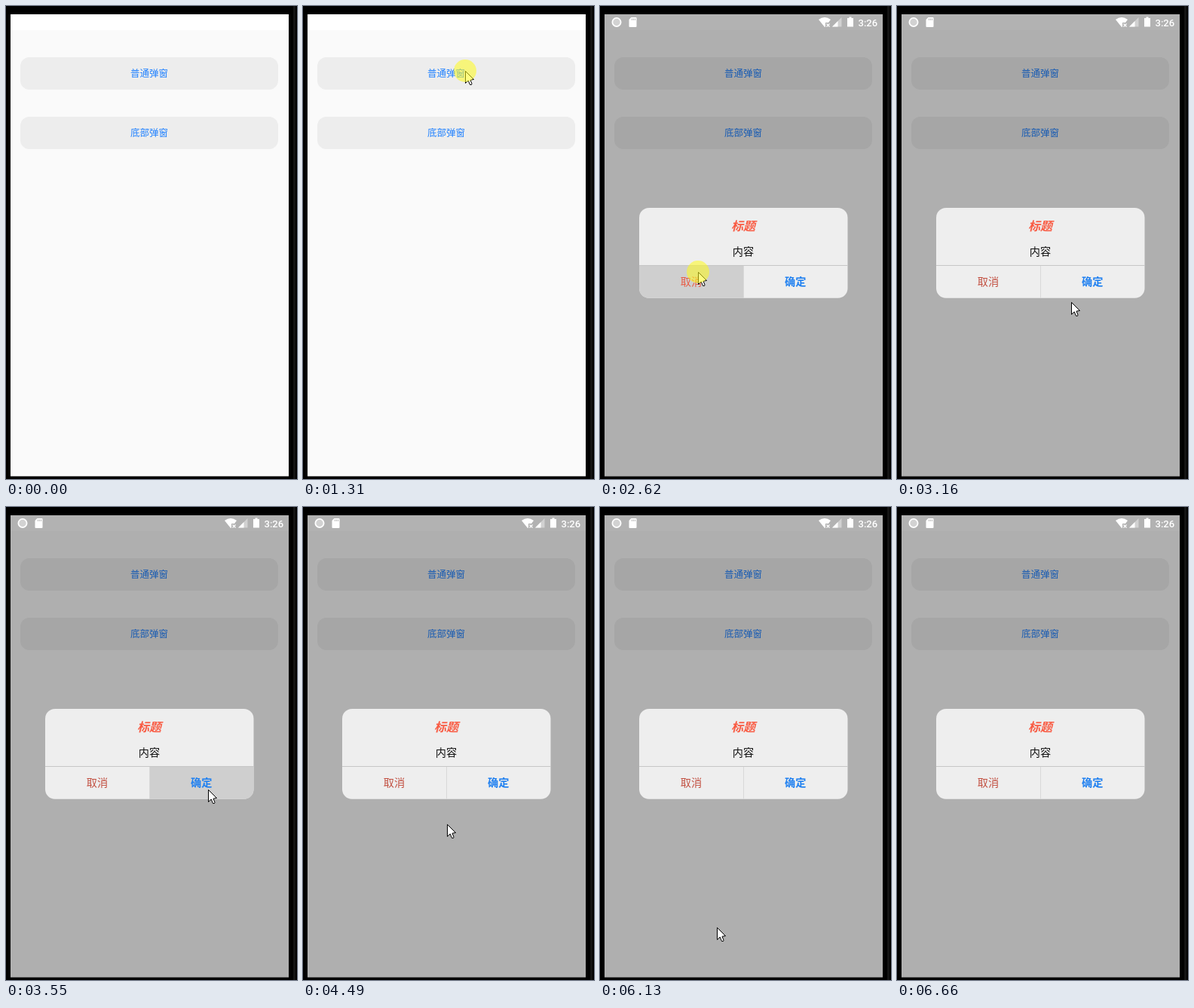
Animation, 386 px wide and 628 px high, one loop 7.12 s. Source, as an HTML page:

```html
<!DOCTYPE html>
<html lang="zh">
<head>
<meta charset="utf-8">
<title>弹窗</title>
<style>
  html, body { margin: 0; width: 100%; height: 100%; overflow: hidden; background: #000; }
  svg { display: block; width: 386px; height: 628px; }
  text { font-family: "Noto Sans CJK SC", "Noto Sans CJK", sans-serif; text-anchor: middle; }
  .button { fill: #ededed; }
  .link { font-size: 12.5px; fill: #1f80ff; }
  .label { font-size: 14.2px; }
  .strong { font-weight: 700; }
  .title { font-size: 16px; font-style: italic; fill: #f95a42; }
  .clock { font: 500 13px Roboto, sans-serif; text-anchor: start; }
  .pressed { fill: #cfcfcf; }
</style>
</head>
<body>
<svg viewBox="0 0 386 628">
  <defs>
    <clipPath id="card"><rect x="52" y="268" width="276.5" height="119.8" rx="13"/></clipPath>
  </defs>
  <rect width="386" height="628"/>
  <rect x="381" width="3" height="628" fill="#141414"/>

  <rect x="6" y="11" width="369" height="613.4" fill="#fafafa"/>
  <rect x="6" y="11" width="369" height="21" fill="#fff"/>
  <rect class="button" x="19" y="68" width="342" height="43" rx="12"/>
  <text class="link" x="190" y="94.3">普通弹窗</text>
  <rect class="button" x="19" y="147" width="342" height="43" rx="12"/>
  <text class="link" x="190" y="173.3">底部弹窗</text>

  <rect id="dim" x="6" y="11" width="369" height="613.4"/>

  <g id="status" fill="#fff">
    <circle cx="22" cy="21.5" r="5.6" fill="#d2d2d2" stroke="#fff" stroke-width="1.8"/>
    <path d="M41.5 15H47.5Q48.5 15 48.5 16V27Q48.5 28 47.5 28H39.5Q38.5 28 38.5 27V18Z"/>
    <path d="M42.5 16.5V19M44.5 16.5V19M46.5 16.5V19" stroke="#b2b2b2" stroke-width=".9"/>
    <path d="M290 18Q298 12 306 18L303 22H299V27.5L298 28Z"/>
    <path d="M300.5 23.5L304.5 27.5M304.5 23.5L300.5 27.5" stroke="#fff" stroke-width="1.2"/>
    <path d="M320.5 15V27.5H308Z" opacity=".4"/>
    <path d="M315.5 20V27.5H308Z"/>
    <path d="M330.5 14.5H333.5V16H336V27.5H328V16H330.5Z"/>
    <text class="clock" x="342.5" y="26.5">3:26</text>
  </g>

  <g id="dialog">
    <g clip-path="url(#card)">
      <rect x="52" y="268" width="277" height="120" fill="#eee"/>
      <rect class="pressed" id="cancelBg" x="52" y="345" width="138" height="43"/>
      <rect class="pressed" id="okBg" x="190" y="345" width="139" height="43"/>
      <rect x="52" y="344" width="277" height="1" fill="#c6c6c6"/>
      <rect x="190" y="345" width="1" height="43" fill="#d8d8d8"/>
    </g>
    <text class="title strong" x="190" y="298">标题</text>
    <text class="label" x="190" y="331.3" fill="#111">内容</text>
    <text class="label" id="cancel" x="121" y="371">取消</text>
    <text class="label strong" x="259.3" y="371" fill="#2080f0">确定</text>
  </g>

  <g id="mouse">
    <path d="M.5 .5V16.5L4.2 13L6.5 18.5H8.5L9 17.2L7 12.2L11.5 11.5Z" fill="#fff" stroke="#000" stroke-linejoin="round"/>
    <circle id="ring" r="15" fill="#fffb18" opacity=".54"/>
  </g>
</svg>
<script>
const LOOP = 7120;
const $ = id => document.getElementById(id);
const clamp = v => Math.max(0, Math.min(1, v));
const show = (id, on) => $(id).setAttribute("visibility", on ? "visible" : "hidden");

// Each glide is a parabola that passes "via" halfway; it starts where the last one ended
const glides = [];
function glide(start, end, via, to, from = glides[glides.length - 1].to) {
  glides.push({ start, end, from, via, to });
}
glide(50, 780, [255, 280], [215, 86], [361, 632]);
glide(1910, 2570, [246, 240], [130, 353]);
glide(2720, 3390, [210, 392], [268, 375]);
glide(3780, 4180, [222, 427], [229, 430]);
glide(4380, 4930, [144, 454], [93, 632]);
glide(5620, 6330, [139, 576], [190, 541], [140, 632]);
glide(6360, 6660, [245, 513], [322, 632]);

function pointer(t) {
  const g = glides.filter(g => g.start <= t).pop() || glides[0];
  const u = clamp((t - g.start) / (g.end - g.start));
  return g.from.map((a, k) => Math.round(
    a * (1 - u) * (1 - 2 * u) + 4 * g.via[k] * u * (1 - u) + g.to[k] * u * (2 * u - 1)));
}

function draw(t) {
  const during = (a, b) => t >= a && t < b;

  const open = clamp((t - 1520) / 220);
  const scale = 1 - 0.08 * (1 - open) ** 3;
  $("dim").setAttribute("opacity", 0.3 * open);
  $("status").setAttribute("opacity", open);
  $("dialog").setAttribute("opacity", open);
  $("dialog").setAttribute("transform", `translate(190 328) scale(${scale}) translate(-190 -328)`);

  show("cancelBg", during(2620, 2720));
  show("okBg", during(3490, 3600));
  $("cancel").setAttribute("fill", t < 2720 ? "#e85b44" : "#c24f40");

  $("mouse").setAttribute("transform", `translate(${pointer(t)})`);
  show("ring", during(1310, 1380) || during(2590, 2720) || during(3450, 3550));
}

const start = performance.now();
function tick() {
  draw((performance.now() - start) % LOOP);
  requestAnimationFrame(tick);
}
tick();
</script>
</body>
</html>
```
